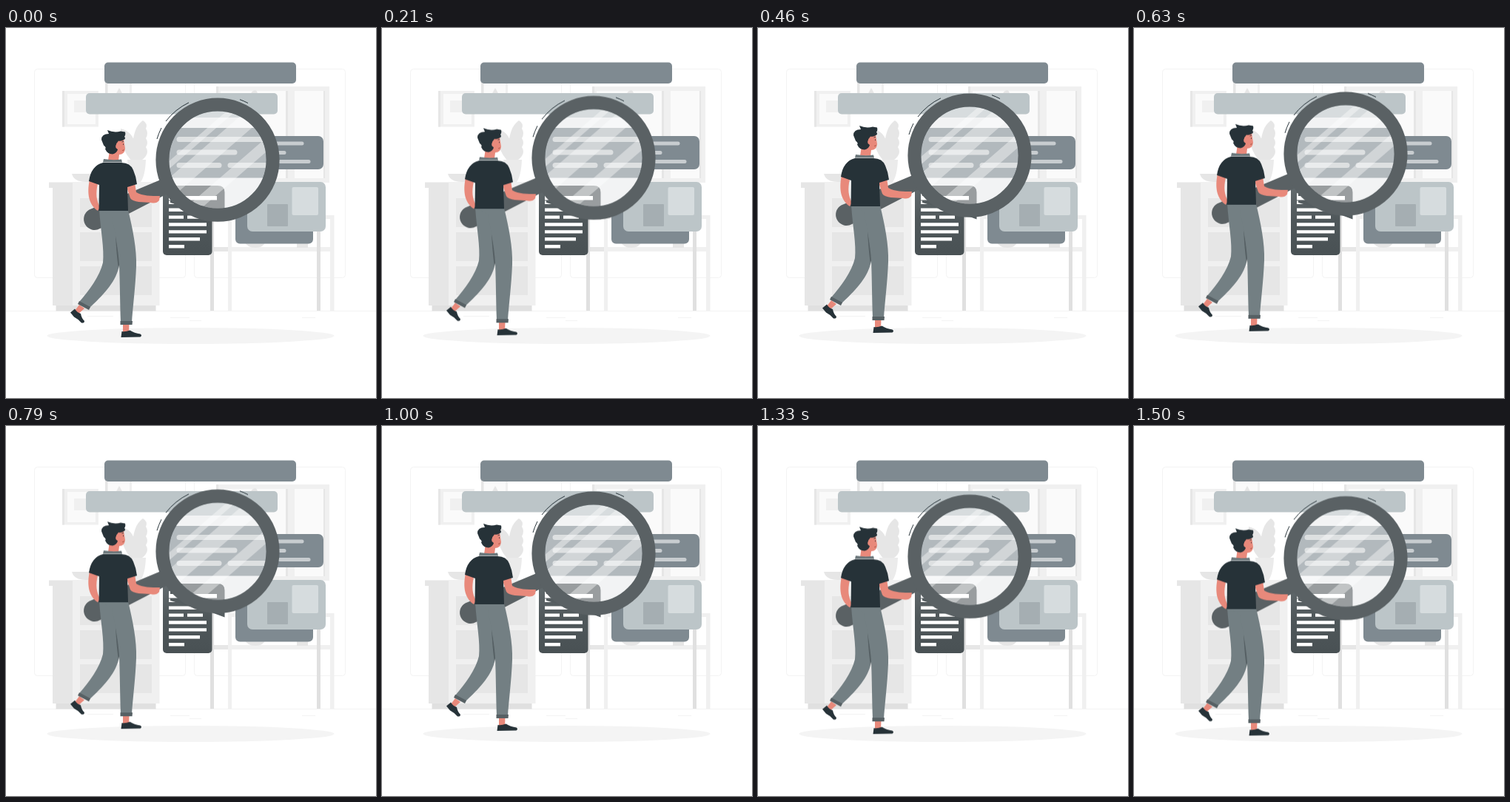
These frames come from a looping animation (500x500 px, 1.54 s). An HTML page without scripts:

```html
<!DOCTYPE html>
<html lang="en">
<head>
<meta charset="utf-8">
<title>Searching</title>
<style>
  html, body { margin: 0; width: 100%; height: 100%; overflow: hidden; background: #fff; }
  svg { display: block; width: 100%; height: 100%; }

  .wall { fill: #f0f0f0; }
  .shade { fill: #e6e6e6; }
  .pane { fill: #fafafa; }
  .hairline { fill: none; stroke: #f3f3f3; }
  .slate { fill: #7f8a91; }
  .mist { fill: #bcc5c8; }
  .skin { fill: #e8897b; }
  .ink { fill: #263238; }
  .steel { fill: #5a6164; }
  .trousers { fill: #737f83; }
  .cuff { fill: #566064; }

  /* 37 even ticks per loop: up for 17, hold one, down for 18 */
  .float { animation: float 1540ms -5ms infinite; }
  @keyframes float {
    0% { transform: translateY(0); animation-timing-function: steps(17); }
    45.946% { transform: translateY(-9.3px); animation-timing-function: steps(1); }
    48.649% { transform: translateY(-9.3px); animation-timing-function: steps(18); }
    97.297% { transform: translateY(.4px); animation-timing-function: steps(1); }
    100% { transform: translateY(0); }
  }
</style>
</head>
<body>
<svg viewBox="0 0 500 500">
  <defs>
    <linearGradient id="page" x2="0" y2="1">
      <stop stop-color="#636b6e"/>
      <stop offset=".5" stop-color="#4f575a"/>
      <stop offset="1" stop-color="#495154"/>
    </linearGradient>
    <clipPath id="lens"><circle cx="286" cy="178.2" r="66"/></clipPath>
    <clipPath id="zoom"><circle cx="286" cy="173.5" r="74"/></clipPath>
  </defs>

  <g id="room">
    <rect class="hairline" x="38.5" y="55.5" width="204" height="282" rx="4"/>
    <rect class="hairline" x="254.5" y="55.5" width="204" height="282" rx="4"/>
    <path class="hairline" stroke="#ebebeb" d="M0 382.5H500M110 389.5h35M222 391.5h26M248 395.5h16M400 391.5h18"/>

    <g id="pictures">
      <path class="wall" d="M76 85h49v48.500h-49zM134 62h36v30h-36zM284 79h153v130h-153z"/>
      <path class="shade" d="M76 85h3v48.500h-3zM134 62h3v30h-3zM284 79h3v130h-3z"/>
      <path class="pane" d="M83 89h38v41h-38zM138 66h29v26h-29zM290 85h88v118h-88zM390 85h39v118h-39z"/>
      <path class="shade" d="M378 85h3v118h-3zM429 85h2v118h-2zM148 90l5-9 5 9zM331 90q0-5 6-6q4 2 2 6z"/>
      <path class="wall" d="M92 98h16v16h-16z"/>
    </g>

    <g id="cupboard">
      <path class="wall" d="M90 208H207.500V375H90z"/>
      <path class="shade" d="M58 208.500H90V375H63V216H58zM100 230h97v39h-97zM100 276h97v39h-97zM100 322h97v39h-97z"/>
      <path fill="#e0e0e0" d="M67.500 375H202.500v7.500H67.500z"/>
      <path class="shade" d="M89 197h37v11h-18q-16 0-19-11z"/>
      <path class="shade" d="M173 181C169 160 171 134 185 125q7 4 4 11q4 6 0 13q4 6 0 12q4 6 0 12q-5 7-12 8zM172 182C158 168 154 150 155 136q16 4 19 20z"/>
      <path fill="#ebebeb" d="M164 178h25q-1 22-7 30h-12q-5-11-6-30z"/>
    </g>

    <g id="desk">
      <path class="wall" d="M300 253h143.500v129H438V302H305v80h-5zM305 258v38h133v-38z" fill-rule="evenodd"/>
      <path fill="#e0e0e0" d="M276 253h5v129h-5zM420 258h5v124h-5z"/>
      <path class="shade" d="M281 296h19v6h-19zM322 288h29q-3 9-14 9t-15-9zM393 288h15v9h-15z"/>
    </g>

    <ellipse cx="249.500" cy="416" rx="194" ry="11" fill="#f4f4f4"/>
  </g>

  <g id="cards">
    <rect class="slate" x="133" y="46.500" width="259" height="28.500" rx="5"/>
    <rect class="mist" x="108" y="88" width="259" height="28.500" rx="5"/>
    <rect class="slate" x="300" y="146" width="129" height="45" rx="7"/>
    <path stroke="#c8cdd0" stroke-width="5" stroke-linecap="round" d="M350 156h50M350 168.500h26M370 180.500h39"/>
    <rect class="slate" x="310" y="224" width="105" height="67.500" rx="6"/>
    <rect class="mist" x="326" y="208" width="106" height="67" rx="7"/>
    <rect x="353" y="238" width="28" height="30" rx="1" fill="#a5aeb2"/>
    <rect x="386.500" y="215" width="35.500" height="38" rx="2" fill="#d6dcde"/>

    <rect x="212" y="213" width="66.500" height="94" rx="5" fill="url(#page)"/>
    <path stroke="#fff" stroke-width="4.400" d="M220 225.500h30M220 235.700h51M220 245.700h51M220 255.600h20M245 255.600h21M220 265.500h51M220 275.400h51M220 285.300h42M220 295.200h21"/>
  </g>

  <g id="magnified">
    <g clip-path="url(#zoom)">
      <path fill="#e9eced" d="M200 90h180v170H200z"/>
      <path class="mist" d="M230 95h110v26H230z"/>
      <path class="slate" d="M210 135h150v67.500H210z"/>
      <path stroke="#c6cbce" stroke-width="7" stroke-linecap="round" d="M234 150.500h130M234 168h75M234 185.500h54M303 185.500h60"/>
    </g>
    <path fill="#555d60" d="M222 213h64q9.500 0 9.500 9V258.500L278 252l-56-16z"/>
    <path stroke="#fff" stroke-width="5.500" d="M220 229.800h65"/>
  </g>

  <g class="float">
    <g id="magnifier">
      <g clip-path="url(#lens)" fill="#fff">
        <circle cx="286" cy="178.200" r="66" opacity=".4"/>
        <path opacity=".4" d="M327 110h34L217 235h-34zM301 110h12L169 235h-12zM390 115h22L268 240h-22z"/>
      </g>
      <path class="steel" d="M112.500 245.500L209 205l9 19L127 271a14 14 0 0 1-14.500-25.500z"/>
      <circle cx="286" cy="178.200" r="74.600" fill="none" stroke="#5a6164" stroke-width="18"/>
      <path fill="none" stroke="#263238" d="M204 150a87.300 87.300 0 0 1 6-15M216 126a87.300 87.300 0 0 1 31-25.200M316 96.700a87.300 87.300 0 0 1 11 4.800"/>
    </g>

    <g id="walker">
      <path class="skin" d="M113 205l11 5c-3 14-2 23 3 32l-3 5c-12-8-15-23-11-42zM99 374l7 5-8 7-5-4zM158 400h8.500l-.5 12h-8z"/>
      <path class="ink" d="M87 384.500l6-5q3 5 8 6.500q1 6 5 10q0 3-4 2.500q-4-5-10-8zM156.500 410q5 1 11-1.500q6 4 14 5q3 2 0 4l-26 .5z"/>

      <path class="trousers" d="M126 246c2 29 7 52 5 71-4 18-19 38-32 53l14 8c17-16 34-33 39-53l4-79z"/>
      <path class="cuff" d="M148 278l6 38-2 9q-3-20-4-47z"/>
      <path class="trousers" d="M128 246h37c6 24 12 54 11 76-1 28-5 58-6 76h-15c-1-28-1-53-2-78-1-20-6-45-10-65z"/>
      <path class="cuff" d="M99 369l15 8-2 4-15-8zM154.500 396H171l-.5 5h-16z"/>

      <path class="skin" d="M148 152l11-2 2 13q-1 8-8 8l-1 8q-8 3-14 0l2-14z"/>
      <path class="ink" d="M129 151q0-8 10-8l-2-5q9 4 18 1.500l6 1q1 4-1 6q2 3 0 4q-4 3-8 2l-3 4v5l2 3q-2 5-7 6q-7 0-10-7q2-2-2-5z"/>
      <circle class="skin" cx="151.500" cy="160" r="3.300"/>
      <path fill="none" stroke="#263238" stroke-width=".8" d="M156.500 154l2.500-.8M158.500 156.500v1.500"/>
      <path fill="none" stroke="#a24e3f" stroke-width=".8" d="M157 165.500l3-.8"/>
      <path class="skin" d="M162 212l12-3 2 13c9 5 20 5 32 5l-1 6q-4 5-11 3c-11-1-24 0-28-6z"/>
      <path class="ink" d="M131 182h25q12 0 16 10 4 9 5 19l-13 4 1 32h-39.500l.5-35-14-5q3-21 19-25z"/>
      <path fill="#6b777b" d="M132 177q12 2 24 .5l1 4h-26z"/>
    </g>
  </g>
</svg>
</body>
</html>
```
